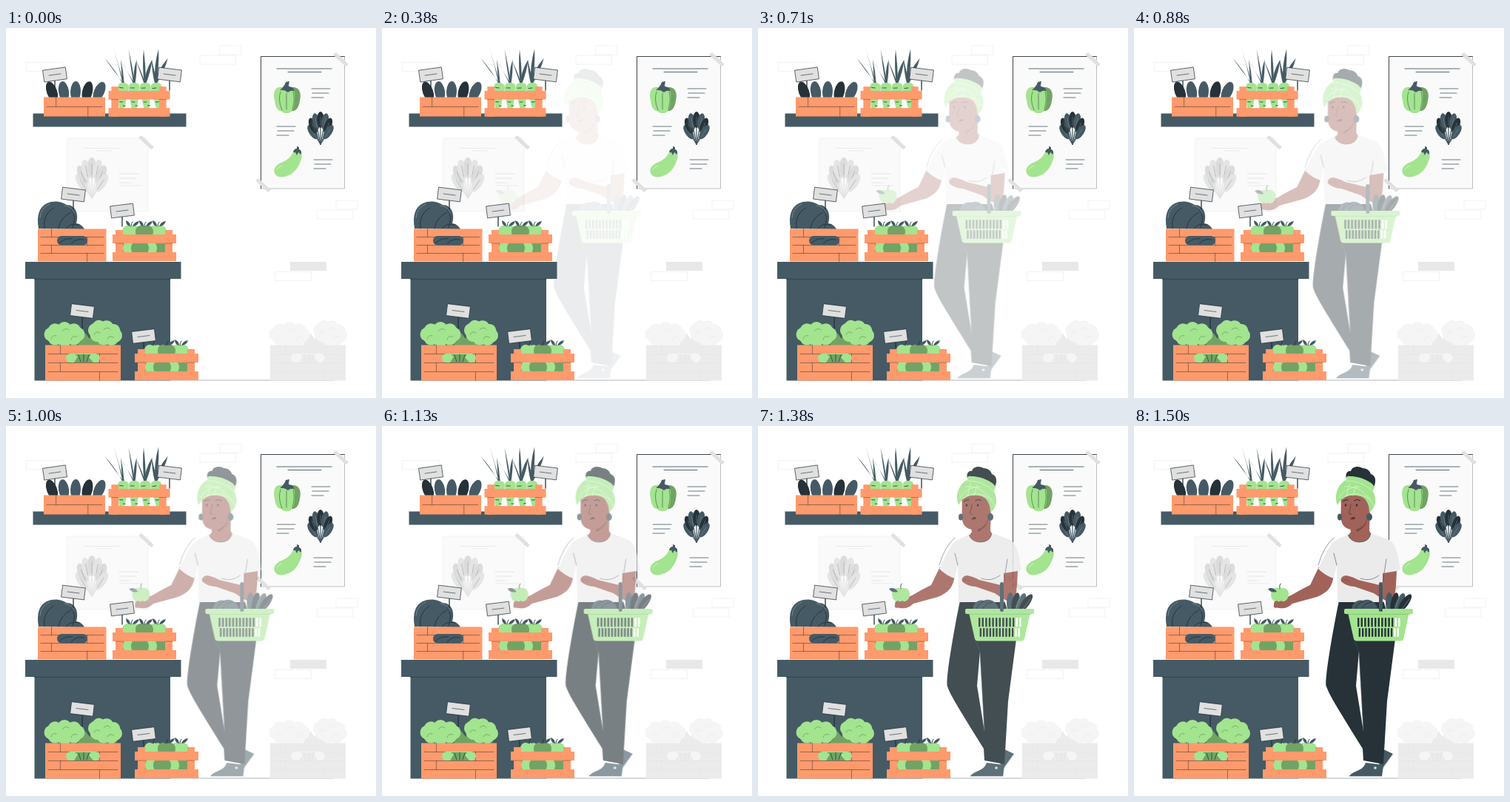
An HTML page for the animation above (1540 ms loop, 500 by 500 pixels).

```html
<!DOCTYPE html>
<html lang="en">
<head>
<meta charset="utf-8">
<title>Vegetable stall</title>
<style>
html, body { margin: 0; width: 100%; height: 100%; overflow: hidden; background: #fff; }
svg { display: block; width: 100%; height: 100%; }
</style>
</head>
<body>
<svg id="stage" viewBox="0 0 500 500"></svg>
<script>
const DARK = '#263238', NAVY = '#455a64', GREEN = '#a3e48f', MOSS = '#72a364', ORANGE = '#ff9a6c',
      SKIN = '#a1625a', SHADE = '#7d463f', PAPER = '#fafafa', GREY = '#e0e0e0', PALE = '#ebebeb';

const path = (d, fill) => `<path d="${d}" fill="${fill}"/>`;
const line = (d, color = DARK, width = .6) =>
  `<path d="${d}" fill="none" stroke="${color}" stroke-width="${width}" stroke-linecap="round"/>`;
const rect = (x, y, w, h, fill, rx = 0) =>
  `<rect x="${x}" y="${y}" width="${w}" height="${h}" rx="${rx}" fill="${fill}"/>`;
const oval = (x, y, rx, ry, fill, turn = 0) =>
  `<ellipse rx="${rx}" ry="${ry}" fill="${fill}" transform="translate(${x} ${y}) rotate(${turn})"/>`;
const group = (x, y, body, more = '') => `<g transform="translate(${x} ${y}) ${more}">${body}</g>`;
const repeat = (n, draw) => Array.from({ length: n }, (_, i) => draw(i)).join('');

const brick = (x, y, w) => line(`M${x} ${y}h${w}v12h-${w}z`, '#ececec', .7);
const tape = (x, y) => path(`M${x} ${y}l4-3 17 16-4 3z`, GREY);
const note = (x, y, color) => line(`M${x} ${y}h25m-24 6h22m-23 6h16`, color, .8);

// Paper sign on a stick that ends at height `foot`
const tag = (x, y, turn, foot) => line(`M${x} ${y}V${foot}`, DARK, 1.3) + group(x, y,
  `<rect x="-15.500" y="-8" width="31" height="16" fill="${GREY}" stroke="${DARK}" stroke-width=".7"/>` +
  line('M-8 0H8'), `rotate(${turn})`);

// Box of planks with staggered joints
const box = (x, y, w, rows, rowHeight, fill, ink) => rect(x, y, w, rows * rowHeight, fill) +
  repeat(rows - 1, i => line(`M${x + 4} ${y + rowHeight * (i + 1)}h${w - 8}`, ink, .5)) +
  repeat(rows, i => line(`M${x + w * (i % 2 ? .72 : .2)} ${y + rowHeight * i}v${rowHeight}`, ink, .5));

// Leaves fanned out from the foot of the bunch
const bouquet = (color, dark) => repeat(7, i => {
  const k = i - 3, r = 41 - 1.5 * k * k;
  return group(0, 0, line(`M0 0V${14 - r}`, color, 1.2) +
    oval(0, 8 - r, 4.8, 11, i % 2 ? dark : color) + line(`M0 ${16 - r}v-12`, '#8a999f', .4), `rotate(${11 * k})`);
});

const slats = rect(4, -6, 10, 42, ORANGE) + rect(71, -6, 10, 42, ORANGE) +
  rect(0, 0, 86, 12, ORANGE) + rect(0, 24, 86, 12, ORANGE) + line('M4 12h10m57 0h10', DARK, .4);

const apple = (x, y, color) =>
  path(`M${x} ${y - 8}c4-3 12-1 12 7 0 8-6 12-12 10-6 2-12-2-12-10 0-8 8-10 12-7`, color);
const appleCrate = (x, y) => group(x, y,
  rect(14, 12, 57, 12, MOSS) + apple(48, 19, GREEN) + apple(26, 19, GREEN) + apple(37, 19, MOSS) +
  apple(25, -3, GREEN) + apple(61, -3, GREEN) + apple(43, -3, MOSS) +
  repeat(3, i => group(25 + 18 * i, -11, line('M0 0q0-4 2-6', DARK, .9) +
    path('M-1 0q-6-1-6-8 6 2 6 8M2 0q2-6 9-7-2 7-9 7', NAVY))) + slats);

// Ring of puffs around a core
const floret = (x, y, rx, turn, leaf, stem) => group(x, y,
  oval(0, 0, rx + 4, 11, leaf) + repeat(8, i => {
    const a = i * Math.PI / 4;
    return oval(rx * Math.cos(a), 7.5 * Math.sin(a), 9.5, 9.5, leaf);
  }) + line(`M${-rx} 6q1-6 7-4M-3-4q4-6 9-2M${rx - 9} 7q1-6 8-4`, stem, .8), `rotate(${turn})`);
const broccoliCrate = (leaf, stem, fill, ink) =>
  path('M97 429l10-17 6 8 8-14 8 23z', stem) +
  floret(79, 414, 18, 0, leaf, stem) + floret(134, 412, 14, 15, leaf, stem) +
  box(53, 428.5, 102, 4, 12, fill, ink) + rect(81, 440, 46, 12, leaf, 6) +
  path('M92 452l5-8-4-3h22l-3 4 6 7z', stem) + line('M98 442l3 9m4-10v10m7-9l-3 9', ink, .7);

const wall = brick(27.5, 46.5, 50) + brick(289, 24, 29) + brick(262.5, 37, 48) + brick(446.5, 233, 29) +
  brick(421, 246, 48) + brick(363.5, 329.5, 49) + rect(384, 316, 49, 12, '#e8e8e8');

const pepper =
  path('M384 81C395 77 400 87 397 98 396 107 392 114 383 112z', MOSS) +
  path('M376 81C364 76 360 87 363 98 364 108 368 114 376 112z', GREEN) +
  path('M380 82C369 78 367 90 369 102 370 113 374 115 379 115 386 116 390 109 390 97 391 84 388 79 380 82', GREEN) +
  line('M371 86q-4 11 2 25m15-25q3 11-1 24m-8-22v22', DARK, .5) +
  path('M370 84q7-6 8-11l5-1q-1 4-1 7 6 0 8 6-6-1-9 2-5-4-11-3', NAVY);

const eggplant =
  path('M388 168C396 163 402 170 399 177 396 187 390 198 376 201 367 203 360 197 363 190 367 180 381 183 388 168', GREEN) +
  line('M366 191q2-4 7-5', '#d4f4c8', 1) +
  path('M388 168q1-5 5-5v-3l3 1v3q4 1 3 7l-4-3-2 4-2-4z', NAVY);

const poster =
  rect(344, 38, 114, 179, PAPER) + line('M344.500 217V38.500h113', DARK, .9) + line('M457.500 39v178H345', '#78858b', .5) +
  line('M366 55h74m-59 4.500h45', NAVY, .9) + note(413, 82, NAVY) + note(366, 133, NAVY) + note(416, 178, NAVY) +
  pepper + group(425, 157, bouquet(NAVY, DARK)) + eggplant + tape(442, 36) + tape(337, 206);

const fadedPoster = rect(83, 149, 109, 99, PAPER) + line('M83 149h109v99H83z', PALE) +
  line('M104 162.500h50m-33 3.500h21', GREY) + note(153, 197, GREY) + line('M153 213h30', GREY) +
  group(116, 230, bouquet('#e5e5e5', '#dcdcdc'), 'scale(1.25)') + tape(179, 148);

const carrot = i => {
  const x = 159 + 14.4 * i, lean = (i - 1.5) * 9 - 4;
  return group(x, 74,
    repeat(3, j => {
      const tipX = lean + 11 * (j - 1), tipY = -45 + 14 * Math.abs(j - 1);
      return path(`M-1 2Q${tipX * .3 - 3} ${tipY / 2} ${tipX} ${tipY}Q${tipX * .6 + 2} ${tipY / 2} 1 2`, NAVY);
    }) +
    path('M0 0C8 0 8 5 7 12L3 42Q0 46-2 42L-7 12C-8 5-8 0 0 0', GREEN) +
    line('M-5 7h5m2 7h4m-9 12h4m1 5h3', DARK, .8), `rotate(${5 - 4 * i})`);
};

const topShelf =
  rect(36.5, 115.5, 207, 18, NAVY) + tag(66, 63, -8, 95) +
  repeat(5, i => oval(62 + 16 * i, 86, 7, 14, i % 3 ? NAVY : DARK, -20 + 11 * i)) +
  box(51, 93.5, 83, 2, 13, ORANGE, DARK) +
  repeat(4, carrot) + group(138.5, 85, slats, 'scale(.965)') + tag(221, 63, 7, 84);

const cabbage =
  path('M44 271C41 253 45 242 55 237 65 232 76 235 82 239 93 239 99 250 95 264 101 265 104 268 106 272z', NAVY) +
  line('M52 271q-3-18 12-28m7 28q2-15 17-22m0-4q8 9 2 25m-9 1q5-8 18-5', DARK, .9) +
  line('M46 256q1-13 13-18m20 2q10 1 13 10', '#a5b0b5', .5);

const counter =
  rect(38.5, 338, 183.5, 138.5, NAVY) + rect(26, 316, 210.5, 23, NAVY) + line('M38 339.300h184') +
  cabbage + box(43, 271.5, 92.5, 4, 11, ORANGE, DARK) + rect(69, 281, 41, 12.5, NAVY, 6) +
  line('M72 291q8-8 17-6m-1 7q5-8 17-6', DARK, .9) + tag(91, 225, 7, 245) +
  appleCrate(144, 279) + tag(157, 247, -7, 268);

const floorCrates = tag(103, 382.5, 7, 407) + broccoliCrate(GREEN, MOSS, ORANGE, DARK) +
  appleCrate(174, 440) + tag(186, 416.5, -7, 432);

const head =
  path('M287 71C285 64 289 60 293 61 294 55 303 53 309 57 315 57 319 61 320 65 327 67 328 75 323 85z', DARK) +
  path('M290 130L319 112 318 141 322 150C313 161 295 160 288 150L293 143z', SKIN) +
  path('M279 94C281 112 278 122 281 131 285 141 297 142 306 136 315 130 320 120 318 108L308 90z', SKIN) +
  path('M300 140q11-3 15-14 0 9-13 17z', SHADE) +
  path('M275 107C269 92 277 77 288 72 285 70 288 67 292 68 306 68 321 75 325 82L323 88C329 101 326 111 318 117 318 107 315 98 306 95 295 92 284 94 278 102z', GREEN) +
  line('M286 74q20-1 37 14m-46 9q8-15 28-15m-23 16q14-14 39 2m-37-18q25-3 40 26m-33-30l-4 17m13-15l-4 14', '#d6f5ca', .8) +
  oval(278, 123, 3, 4.5, NAVY) + oval(318, 123, 4, 5, NAVY) +
  line('M283 102q2-3 6-2m9 1q4-3 7 0', DARK, 1.2) + oval(286, 107, 1.2, 1.7, DARK) + oval(301, 107, 1.2, 1.7, DARK) +
  line('M293 106q0 7-3 11 1 3 4 2', DARK, .6) + path('M292 126q4-5 7-2 0 3-7 2', '#5e302c');

const legs =
  path('M337 437l13 6-16 22-4-13z', NAVY) + line('M350 444l-15 21', GREY, 1.2) +
  path('M277 236h60L353 288 342 372 337 457 310 452 309 436C278 386 264 364 260 352 257 346 267 285 277 236', DARK) +
  path('M304 305L300 351 310 412z', '#fff') +
  line('M298 291q4 8 6 14l6 107', NAVY) +
  path('M291 473C297 465 309 467 313 455l24 3-2 16h-44z', NAVY) +
  line('M291 473.500h44', '#bfc7ca', 1.2) + oval(326, 462, 1.8, 1.8, GREY);

const reachingArm =
  path('M250 190L270 202C268 217 262 225 247 231L214 240C208 246 202 247 196 246 190 246 188 241 190 237L212 229Q229 219 238 215z', SKIN) +
  group(197, 228, apple(0, 0, GREEN) + line('M0-8q-1-5 1-7', DARK, .9) + path('M-4-4q-8 2-12-4 7-3 12 4', NAVY)) +
  repeat(3, i => oval(192 + 6 * i, 241, 2.6, 5, SKIN, 20));

const shirt =
  path('M289 147Q278 151 270 156C261 166 255 181 249 193Q258 202 270 206L274 188 275 238H337L336 205Q350 201 360 194C357 176 354 159 345 154Q333 149 320 145 318 157 304 157 292 156 289 147', PALE) +
  line('M289 147q4 10 15 10 14 0 16-12m-46 43l-4-16m71 8l-4 25m-31 1q13 5 25-4m-61-51q-14 12-21 37', DARK, .5);

const basketArm =
  path('M336 199L355 196C354 214 354 226 350 237 341 239 332 231 324 226L298 217C291 217 284 214 280 210 278 205 283 202 287 202 292 203 298 205 303 208L336 216z', SKIN) +
  line('M281 209q5-3 9 1m44 6q4-7 4-14', SHADE);

const slot = i => {
  const x = 302 + 4.6 * i, fill = x < 349 ? DARK : '#fff';
  return rect(x, 259, 2.4, 12.5, fill, 1) + rect(x + (330 - x) * .06, 273, 2.4, 12, fill, 1);
};
const basket =
  path('M294 249C294 239 302 234 309 236 318 232 328 238 330 249z', NAVY) +
  line('M299 248q2-9 11-11m-3 11q4-9 14-10', DARK, .9) +
  repeat(4, i => oval(345 + 7 * i, 239, 5, 14, i % 2 ? DARK : NAVY, 12 * i)) +
  line('M353 246l7-18m0 22l12-16', '#8a999f') +
  path('M289 252h83l-8 36q-1 2.500-4 2.500h-59q-3 0-4-2.500z', GREEN) + repeat(13, slot) +
  rect(284, 247, 93, 7, GREEN, 2) + line('M288 254.300h85', MOSS, .5) + rect(331, 211, 5, 40, NAVY, 2.5);

stage.innerHTML =
  wall + poster + fadedPoster + line('M222 476h220', '#9aa3a7', .8) +
  group(304, 0, broccoliCrate('#f5f5f5', PALE, PALE, GREY)) +
  `<g id="shopper">${legs + reachingArm + head + shirt + basketArm + basket}</g>` +
  topShelf + counter + floorCrates;

const shopper = document.getElementById('shopper');
const LOOP = 1540, RISE = 1500, TICK = 1000 / 24;

// Same curve as CSS ease-in: cubic-bezier(.42, 0, 1, 1)
function easeIn(x) {
  let low = 0, high = 1;
  for (let i = 0; i < 24; i++) {
    const u = (low + high) / 2;
    if (1.26 * u * (1 - u) ** 2 + 3 * u * u * (1 - u) + u ** 3 < x) low = u; else high = u;
  }
  return 3 * low * low * (1 - low) + low ** 3;
}

const start = performance.now();
function draw() {
  const time = (performance.now() - start) % LOOP;
  const step = Math.floor((time + 5) / TICK);
  const p = step < 5 ? 0 : easeIn(Math.min(1, step * TICK / RISE));
  shopper.setAttribute('opacity', p);
  shopper.setAttribute('transform', `translate(${-30 * (1 - p)} 0)`);
  requestAnimationFrame(draw);
}
draw();
</script>
</body>
</html>
```
